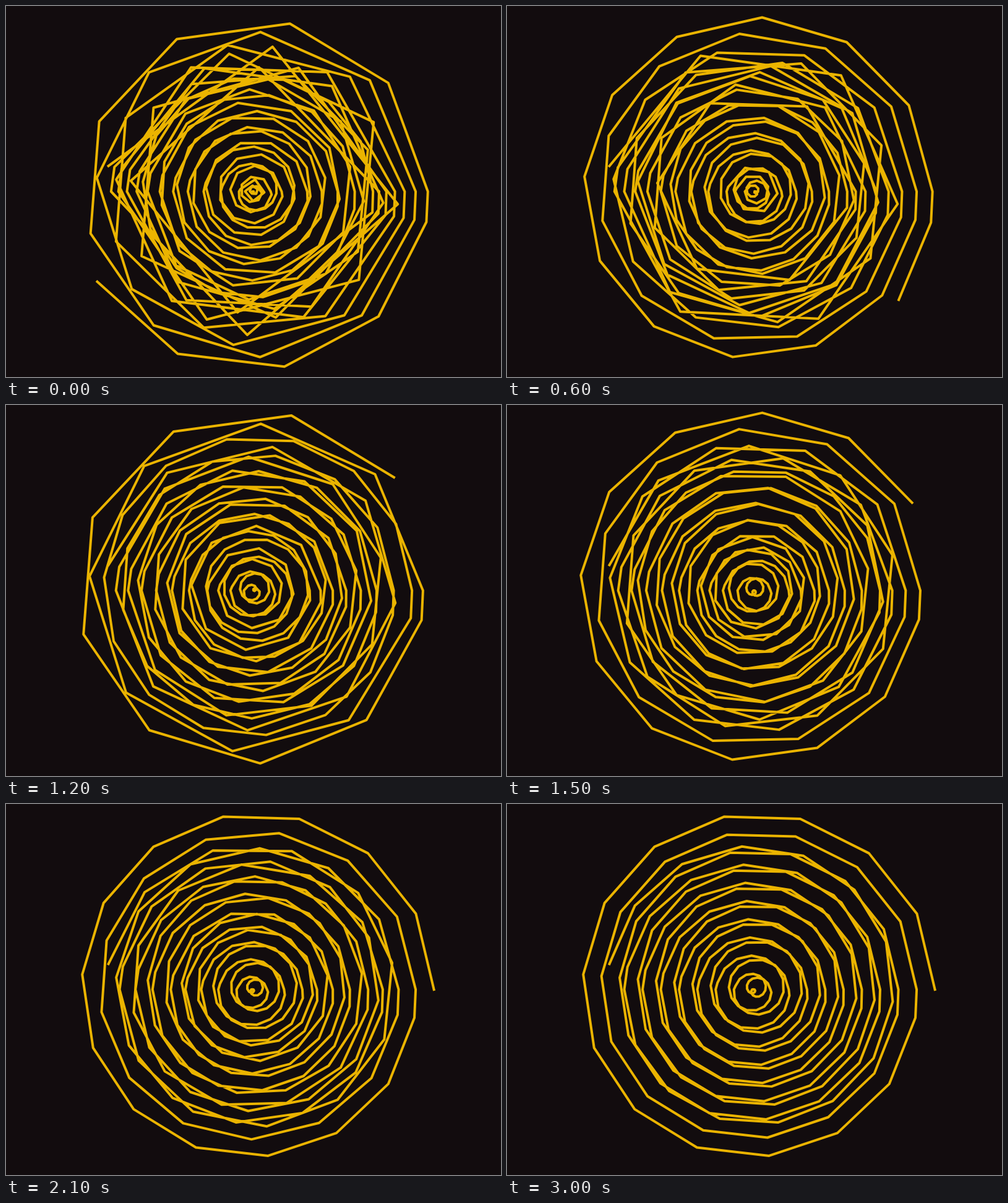
Write an HTML page with a canvas that moves like this. It is 800x600 px and loops after 3.3 s.

```html
<!DOCTYPE html>
<html lang="en">
<head>
<meta charset="utf-8">
<title>Spiral</title>
<style>
  html, body { margin: 0; width: 100%; height: 100%; overflow: hidden; background: #120c0e; }
  canvas { display: block; }
</style>
</head>
<body>
<canvas id="stage" width="800" height="600"></canvas>
<script>
const ctx = document.getElementById('stage').getContext('2d');
const POINTS = 270, MIN = 4, MAX = 14, STEP_MS = 300;
const SWEEP = 350 * Math.PI / 180;
const STEPS = MAX - MIN + 1;

// Each turn sweeps 350 degrees in n equal segments; n cycles from first to MAX.
function spiral(first) {
  const pts = [];
  let n = first, seg = 0;
  for (let i = 0; i < POINTS; i++) {
    const r = 1.969 * (i - 120.9);
    const a = SWEEP * (1 - seg / n);
    pts.push([400 + r * Math.cos(a), 300 - r * Math.sin(a)]);
    if (++seg > n) {
      seg = 0;
      n = n < MAX ? n + 1 : first;
    }
  }
  return pts;
}

function draw(step) {
  ctx.fillStyle = '#120c0e';
  ctx.fillRect(0, 0, 800, 600);
  ctx.strokeStyle = '#ebb400';
  ctx.lineWidth = 4;
  ctx.lineCap = 'square';
  ctx.lineJoin = 'round';
  ctx.beginPath();
  for (const [x, y] of spiral(MIN + step)) ctx.lineTo(x, y);
  ctx.stroke();
}

const start = performance.now();
let shown = -1;

function tick() {
  const step = Math.floor((performance.now() - start) / STEP_MS) % STEPS;
  if (step !== shown) draw(shown = step);
  requestAnimationFrame(tick);
}
tick();
</script>
</body>
</html>
```
